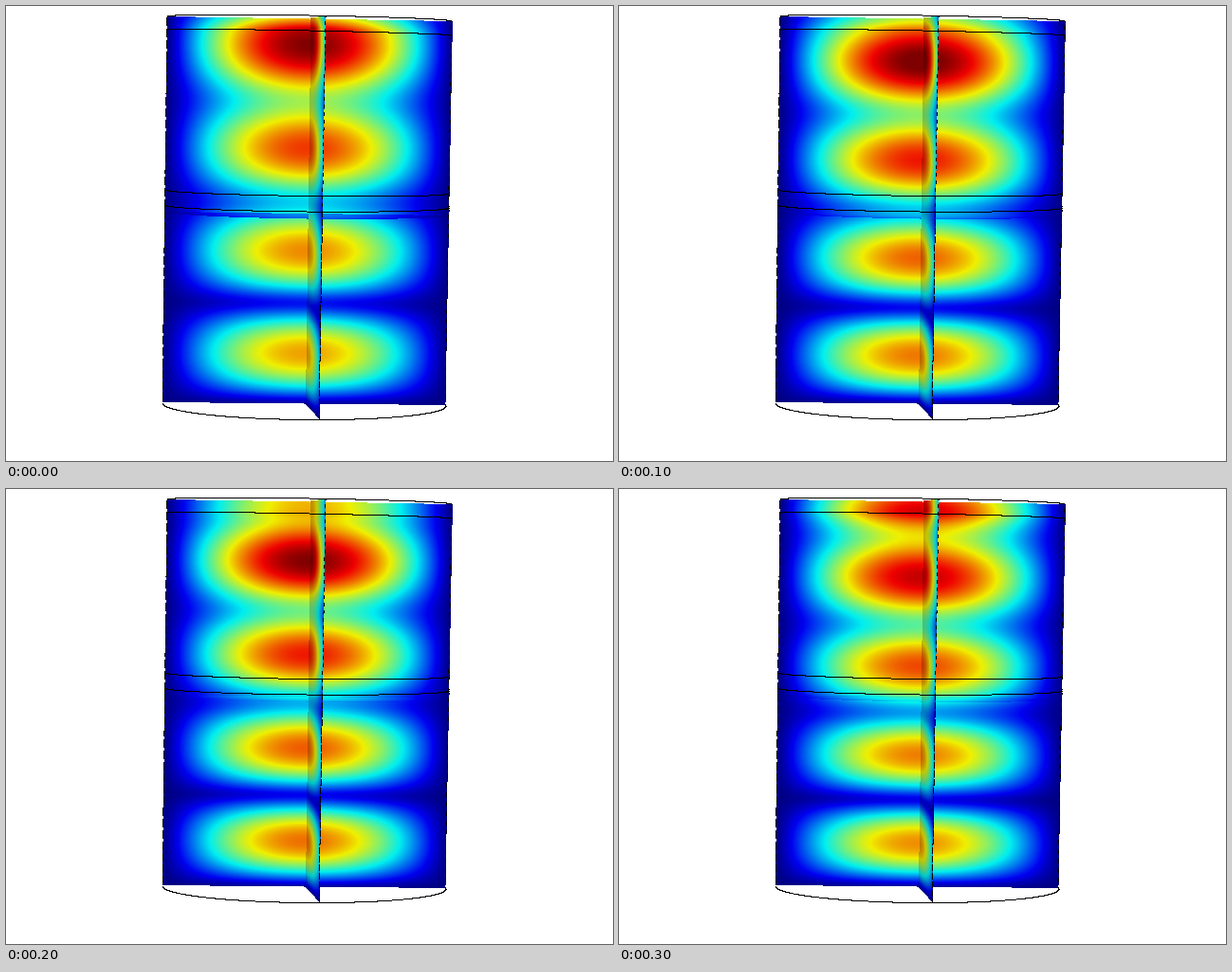
These frames come from a looping animation (640 by 480 pixels, 0.4 s). A matplotlib script:

```python
import numpy as np
import matplotlib.pyplot as plt
from matplotlib.animation import FuncAnimation
from matplotlib.colors import LinearSegmentedColormap

W, H, DPI = 640, 480, 100
FRAMES = 4
TOP, DISC, BOTTOM = 13.5, 219, 419.5
HI, LO = 0.94, 0.5
RAINBOW = LinearSegmentedColormap.from_list("rainbow", [
    (0.0, (0, 0, LO)), (0.125, (0, 0, HI)), (0.375, (0, HI, HI)),
    (0.625, (HI, HI, 0)), (0.875, (HI, 0, 0)), (1.0, (LO, 0, 0))], N=1024)


def lerp(a, b, t):
    return a + (b - a) * t


def axis_strength(i, y):
    """Standing wave on the axis; the wavelength shrinks with each step."""
    rise = np.maximum(BOTTOM + 0.5 - y, 0)
    phase = np.pi * rise / (107 - 4.77 * i)
    gain = 0.705 + 0.055 * np.sin(np.pi * i / 3.4)
    crest = gain * (1 + 0.41 * (rise / 375) ** 2.84)
    trough = np.maximum(0.0019 * rise - 0.06, 0.03)
    damping = 1 - 0.22 * np.clip((25 - y) / 13, 0, 1)
    return damping * np.hypot(crest * np.sin(phase), trough * np.cos(phase))


def falloff(r):
    return np.cos(np.pi / 2 * np.clip(r, 0, 1))


X, Y = np.meshgrid(np.arange(W) + 0.5, np.arange(H) + 0.5)

# Wide slab through the axis
down = (Y - 11) / 407
left, right = lerp(170, 165, down), lerp(471, 463.5, down)
u = (X - left) / (right - left)
R = 2 * u - 1
slab_top, slab_bottom = lerp(11, 16, u), lerp(418, 421, u)
T = (Y - slab_top) / (slab_bottom - slab_top)
SLAB = (abs(R) <= 1) & (T >= 0) & (T <= 1)
SLAB_Y = lerp(TOP, BOTTOM, T)

# Front half of the dividing disc
depth = (Y - lerp(217, 221, u)) / 5.5
DISC_MASK = SLAB & (depth >= 0) & (depth ** 2 + R ** 2 <= 1)
DISC_R = np.sqrt(R ** 2 + 0.2 * depth ** 2)

# Narrow slice that comes forward from the axis
near_x = lerp(337, 330.5, (Y - 11) / 425)
axis_x = lerp(321.5, 316, (Y - 12) / 408)
S = (X - axis_x) / (near_x - axis_x)
slice_top, slice_bottom = lerp(12, 11, S), lerp(420, 436, S)
T = (Y - slice_top) / (slice_bottom - slice_top)
SLICE = (S >= 0) & (S <= 1) & (T >= 0) & (T <= 1)
SLICE_Y = lerp(TOP, BOTTOM, T)

INK = np.zeros((H, W), bool)


def ink(x, y, on=1, period=1):
    """Mark a line one pixel wide, dashed along its height if asked."""
    col, row = np.floor(x).astype(int), np.floor(y).astype(int)
    keep = row % period < on
    INK[row[keep], col[keep]] = True


def segment(x0, y0, x1, y1, on=1, period=1):
    t = np.linspace(0, 1, 1500)
    ink(lerp(x0, x1, t), lerp(y0, y1, t), on, period)


def rim(x0, y0, x1, y1, bulge):
    """Visible half of a ring around the cylinder."""
    a = np.linspace(0, np.pi, 1500)
    t = (1 - np.cos(a)) / 2
    ink(lerp(x0, x1, t), lerp(y0, y1, t) + bulge * np.sin(a))


rim(170, 11, 470, 16, -3.5)
rim(170, 25, 470, 31, -2)
rim(168, 194, 467, 198, 4.5)
rim(167, 210, 467, 213, 5.5)
rim(165, 419, 464, 422, 16)
segment(170, 11, 165, 418, 9, 12)
segment(470, 16, 463, 421, 5, 10)
segment(337, 11, 333.5, 220, 4, 8)
segment(333.5, 220, 330, 436, 7, 9)
segment(167, 209, 167, 214)
segment(467, 196, 467, 200)
segment(467, 211, 467, 219, 2, 5)


def render(i):
    img = np.ones((H, W, 3))
    value = axis_strength(i, SLAB_Y) * falloff(abs(R))
    disc = (0.27 + 0.055 * i) * falloff(DISC_R)
    value = np.where(DISC_MASK, disc, value)
    img[SLAB] = RAINBOW(value[SLAB])[:, :3]
    value = axis_strength(i, SLICE_Y) * falloff(0.75 * S)
    img[SLICE] = RAINBOW(value[SLICE])[:, :3] * lerp(0.8, 0.9, S[SLICE])[:, None]
    img[INK] = 0
    return img


fig = plt.figure(figsize=(W / DPI, H / DPI), dpi=DPI, facecolor="white")
ax = fig.add_axes([0, 0, 1, 1])
ax.axis("off")
picture = ax.imshow(render(0), extent=(0, W, H, 0),
                    interpolation="nearest", aspect="auto")


def update(i):
    picture.set_data(render(i))
    return (picture,)


anim = FuncAnimation(fig, update, frames=FRAMES, interval=100,
                     repeat=True, repeat_delay=0, blit=False)
plt.show()
```
